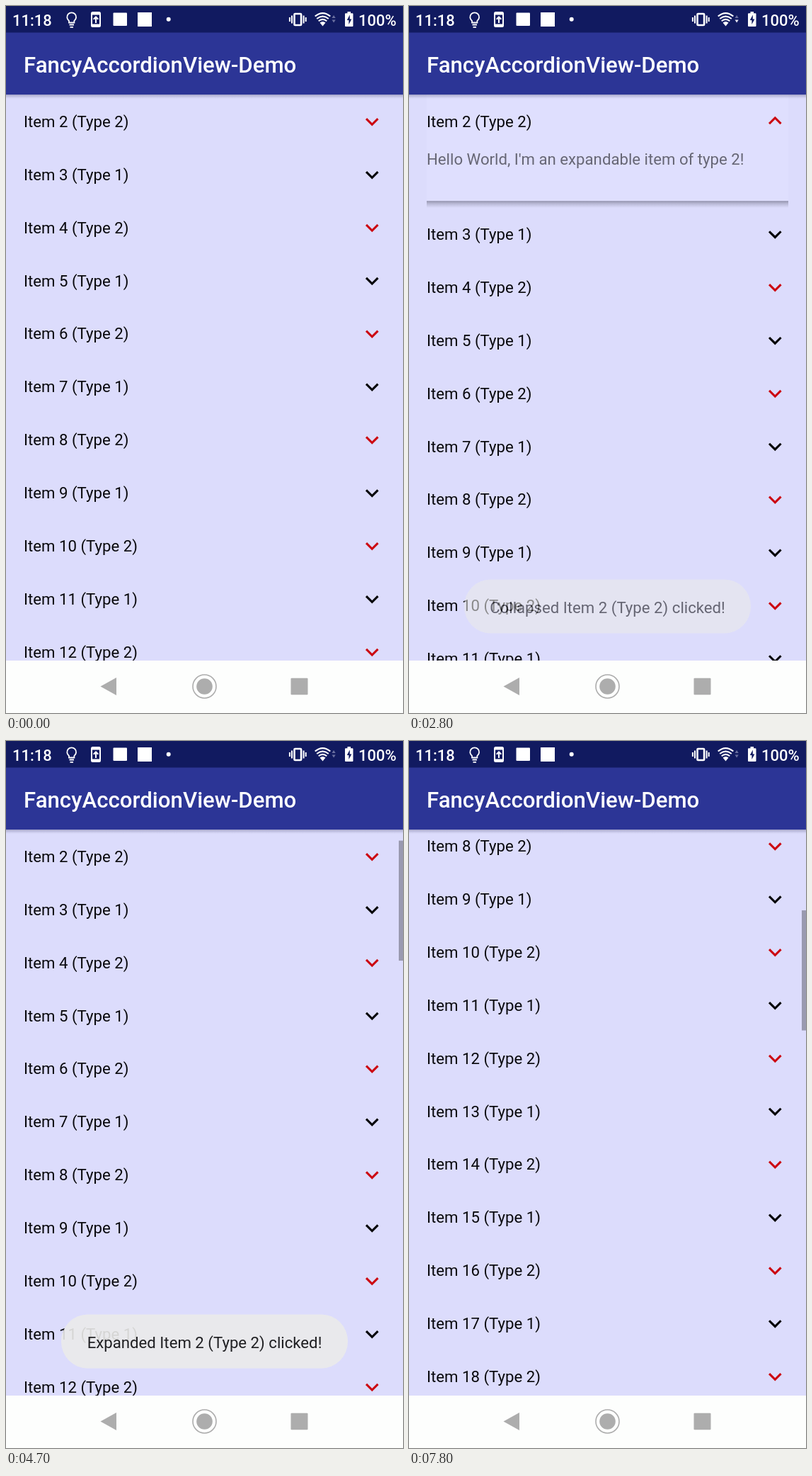
These frames come from a looping animation (561x998 px, 8000 ms). An HTML page:

```html
<!DOCTYPE html>
<html lang="en">
<head>
<meta charset="utf-8">
<title>Accordion list</title>
<style>
  html, body { margin: 0; width: 100%; height: 100%; overflow: hidden; background: #dcdcfc; }
  svg { display: block; width: 100%; height: 100%; font-family: Roboto, "Noto Sans", sans-serif; }
  text { white-space: pre; }
  .body { font-size: 22.2px; }
  .status { font-size: 22px; font-weight: 500; fill: #fff; }
  .line { fill: none; stroke: #fff; stroke-width: 2; }
</style>
</head>
<body>
<svg viewBox="0 0 561 998">
  <defs>
    <clipPath id="listClip"><rect y="124" width="561" height="800"/></clipPath>
    <clipPath id="cardClip"><rect id="cardClipRect" x="0" y="120" width="561" height="80"/></clipPath>
    <linearGradient id="cardShade" x2="0" y2="1">
      <stop offset="0" stop-color="#55556a" stop-opacity=".56"/>
      <stop offset=".4" stop-color="#66667a" stop-opacity=".3"/>
      <stop offset="1" stop-color="#777790" stop-opacity="0"/>
    </linearGradient>
    <linearGradient id="barShade" x2="0" y2="1">
      <stop offset="0" stop-color="#50507a" stop-opacity=".4"/>
      <stop offset="1" stop-color="#8080a0" stop-opacity="0"/>
    </linearGradient>
  </defs>

  <rect width="561" height="998" fill="#dcdcfc"/>
  <g clip-path="url(#listClip)">
    <g id="card">
      <rect id="shade" x="25" width="511" fill="url(#cardShade)"/>
      <rect id="panel" x="25" y="124" width="511" fill="#dfdffe"/>
      <rect id="ripple" x="25" y="124" width="511" fill="#000"/>
      <text class="body" x="25" y="223.5" fill="#000" fill-opacity=".54" clip-path="url(#cardClip)">Hello World, I'm an expandable item of type 2!</text>
    </g>
    <g id="rows"></g>
    <rect id="scrollbar" x="555" width="6" fill="#000" fill-opacity=".3"/>
  </g>

  <g id="toast">
    <rect x="78" y="809.5" width="405" height="76" rx="37.5" fill="#ebecea" fill-opacity=".9"/>
    <text id="toastText" class="body" x="280.5" y="856.5" text-anchor="middle" fill="#1f1f22"></text>
  </g>

  <rect y="125" width="561" height="6" fill="url(#barShade)"/>
  <rect y="37" width="561" height="88" fill="#2c3596"/>
  <rect width="561" height="37.5" fill="#111a60"/>
  <text x="25" y="94" font-size="31.2" font-weight="500" fill="#fff">FancyAccordionView-Demo</text>

  <!-- status bar -->
  <text class="status" x="9" y="27.5">11:18</text>
  <text class="status" x="498" y="27.5">100%</text>
  <g class="line">
    <path d="M89 23.5v-2.6a6.4 6.4 0 1 1 7.4 0v2.6z" stroke-width="1.8"/>
    <path d="M89.5 26.5h6.5M90.5 29.8h4.5" stroke-width="1.8"/>
    <rect x="121" y="9" width="12" height="20" rx="1.5"/>
    <path d="M121 11h12M121 27h12" stroke-width="3"/>
    <path d="M127 24v-7M123.7 18.8l3.3-3.3 3.3 3.3"/>
    <rect x="407.5" y="11" width="9.6" height="16" rx="1" stroke-width="2.6"/>
    <path d="M404 13.5v11M420.6 13.5v11M400.9 16v6M423.7 16v6" stroke-width="2"/>
  </g>
  <g fill="#fff">
    <rect x="151.5" y="9.5" width="19.5" height="18.5" rx="1"/>
    <rect x="186" y="9" width="20" height="20"/>
    <circle cx="229.7" cy="18.8" r="3"/>
    <path d="M447.500 28.500L443.500 23.500Q447.500 20.500 451.500 23.500Z"/>
    <path d="M482.500 8h4.500v2.200h2.500q1 0 1 1v16.800q0 1-1 1h-9.500q-1 0-1-1v-16.800q0-1 1-1h2.500z"/>
    <path d="M485.800 12.500l-4 7.600h2.600v6l4-7.600h-2.600z" fill="#111a60"/>
  </g>
  <g class="line" stroke-width="2.4">
    <path d="M436.700 14.600Q447.500 5.600 458.300 14.600"/>
    <path d="M439.200 18Q447.500 11.200 455.800 18"/>
    <path d="M441.700 21.200Q447.500 16.500 453.300 21.200"/>
  </g>
  <path d="M460.500 17l2.600-4 2.600 4z" fill="#6a70a0"/>
  <path id="netDown" d="M460.500 19.500l2.600 4 2.600-4z"/>

  <!-- navigation bar -->
  <rect y="924" width="561" height="74" fill="#fdfefd"/>
  <g fill="#adadad">
    <path d="M133.500 960.500L156 948v25z"/>
    <circle cx="280.500" cy="960.500" r="11.300"/>
    <circle cx="280.500" cy="960.500" r="16.500" fill="none" stroke="#adadad" stroke-width="1.600"/>
    <rect x="402.500" y="948.700" width="24" height="23.500" rx="1"/>
  </g>
</svg>
<script>
const LOOP = 8000, PITCH = 74.87, FIRST_Y = 163.4, EXTRA = 84.2, SCROLL = 464;
const NS = "http://www.w3.org/2000/svg";
const $ = id => document.getElementById(id);
const set = (el, attrs) => { for (const k in attrs) el.setAttribute(k, attrs[k]); };
const make = (tag, parent, attrs) => {
  const el = parent.appendChild(document.createElementNS(NS, tag));
  set(el, attrs);
  return el;
};

const ramp = (t, a, b) => Math.min(1, Math.max(0, (t - a) / (b - a)));
const smooth = u => (1 - Math.cos(Math.PI * u)) / 2;
const decel = u => 1 - (1 - u) ** 2;

const rows = [];
for (let n = 1; n <= 20; n++) {
  const type = n % 2 ? 1 : 2;
  const g = make("g", $("rows"), {});
  make("text", g, { class: "body", x: 25, y: 7.6, fill: "#08080c" }).textContent = `Item ${n} (Type ${type})`;
  const arrow = make("path", g, {
    d: "M-8.25 -3.5L0 4.7L8.25 -3.5", fill: "none", "stroke-width": 3.1,
    stroke: type === 1 ? "#050508" : "#cc0912", transform: "translate(517.3 -.7)"
  });
  rows.push({ n, g, arrow });
}

// Press highlight around a tap
const press = (t, tap) => ramp(t, tap - 40, tap + 80) * (1 - ramp(t, tap + 250, tap + 600));

const toastAlpha = (t, show, hide) =>
  decel(ramp(t, show, show + 550)) * (1 - ramp(t, hide, hide + 510) ** 1.4);

function barAlpha(t) {
  if (t >= 7140) return 1;
  if (t >= 4080) return 1 - ramp(t, 5640, 5900);
  return t >= 590 ? 1 - ramp(t, 2030, 2400) : 0;
}

function draw(t) {
  const open = smooth(ramp(t, 510, 760)) - smooth(ramp(t, 4060, 4310));
  const drag = 1 - (1 - ramp(t, 7130, 7800)) ** 1.5;
  const scroll = SCROLL * smooth(drag);

  for (const { n, g, arrow } of rows) {
    const y = FIRST_Y + (n - 2) * PITCH - scroll + (n > 2 ? EXTRA * open : 0);
    set(g, { transform: `translate(0 ${y.toFixed(2)})`, display: y < 80 || y > 960 ? "none" : "inline" });
    if (n === 2) {
      set(arrow, { transform: `translate(517.3 -.7) scale(1 ${Math.cos(Math.PI * open).toFixed(3)})` });
    }
  }

  const bottom = 200.9 + (EXTRA - 10) * open;
  const height = bottom - 124;
  set($("card"), { transform: `translate(0 ${-scroll})` });
  set($("panel"), { height, opacity: open > 0 ? 1 : 0 });
  set($("ripple"), { height, opacity: 0.13 * Math.max(press(t, 500), press(t, 4000)) });
  set($("shade"), { y: bottom, height: 3 + 7 * open, opacity: Math.sqrt(Math.max(0, open)) });
  set($("cardClipRect"), { height: bottom - 120 });

  set($("scrollbar"), {
    y: 140.6 + scroll * 0.2122, height: open > 0.5 ? 153 : 169.5, opacity: barAlpha(t)
  });

  const first = t < 3600;
  $("toastText").textContent = `${first ? "Collapsed" : "Expanded"} Item 2 (Type 2) clicked!`;
  set($("toast"), { opacity: first ? toastAlpha(t, 550, 2550) : toastAlpha(t, 4140, 6050) });
  set($("netDown"), { fill: t >= 2600 && t < 3000 ? "#e8e8f4" : "#6a70a0" });
}

const start = performance.now();
function tick() {
  draw((performance.now() - start) % LOOP);
  requestAnimationFrame(tick);
}
tick();
</script>
</body>
</html>
```
